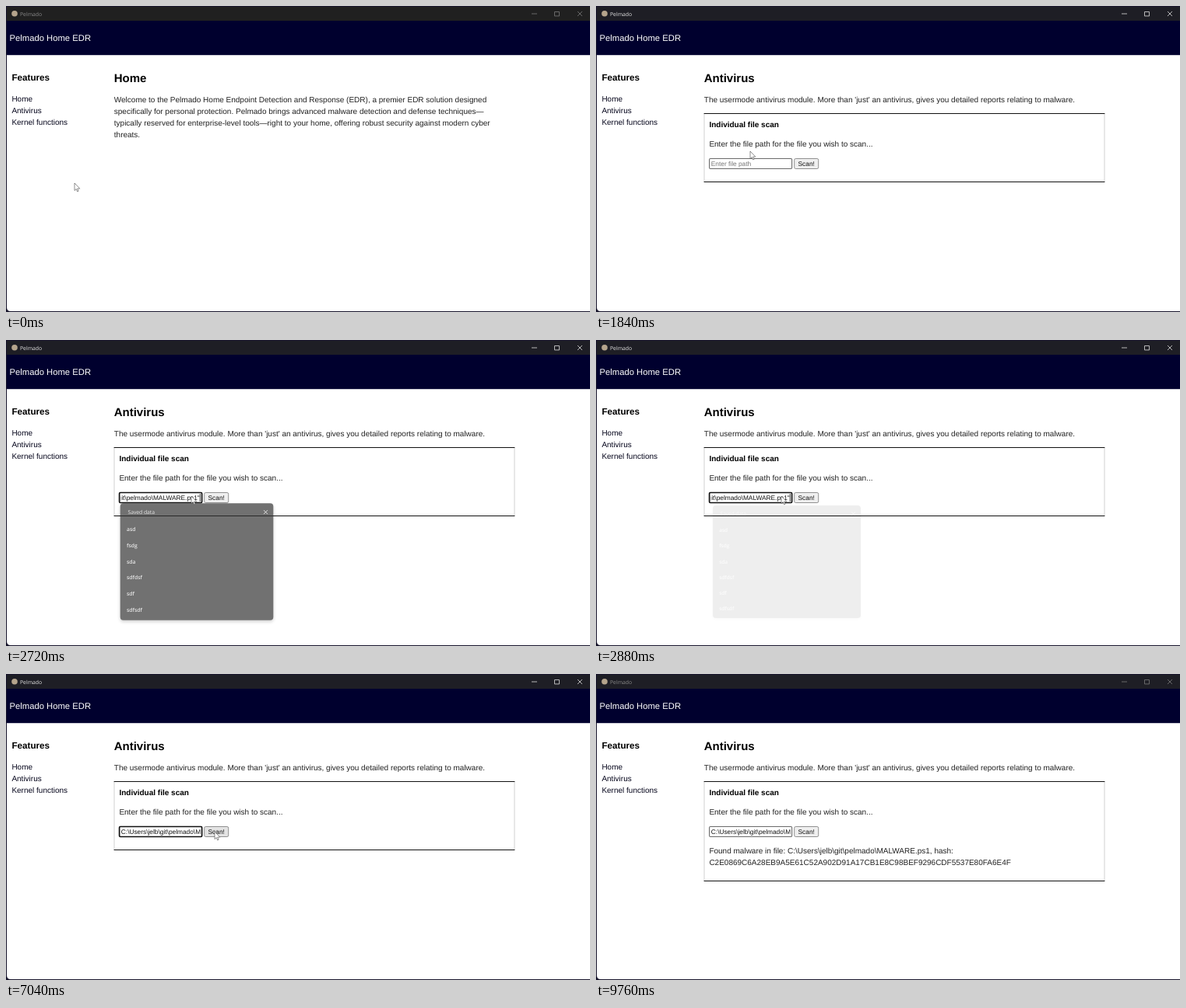
Write an HTML page that moves like this. It is 750x394 px and loops after 9840 ms.

```html
<!DOCTYPE html>
<html lang="en">
<head>
<meta charset="utf-8">
<title>Pelmado</title>
<style>
  html, body { margin: 0; width: 100%; height: 100%; overflow: hidden; background: #17142b; }
  svg { display: block; width: 100vw; height: 100vh; text-rendering: geometricPrecision; }
  text { font: 10px "Liberation Sans", Arial, sans-serif; fill: #222; white-space: pre; }
  .bold { font-weight: bold; fill: #000; }
  .h1 { font-size: 15px; }
  .h2 { font-size: 11.7px; }
  .brand { font-size: 11.25px; fill: #fff; }
  .link { fill: #06061c; }
  .field { font-size: 8.33px; fill: #111; }
  .ui { font: 6.85px "Open Sans", "Noto Sans", sans-serif; }
  #popup text { fill: #fff; fill-opacity: .85; }
  #popup .item { font-weight: 600; }
  #popup { filter: drop-shadow(0 2px 2px #0004); }
</style>
</head>
<body>
<svg viewBox="0 0 750 394">
  <defs><clipPath id="inner"><rect x="147.6" y="197" width="102.2" height="12"/></clipPath></defs>

  <!-- window -->
  <path d="M1 19H750V393H6Q1 393 1 388Z" fill="#fff"/>
  <rect id="bar" x="1" y="1" width="749" height="18"/>
  <rect x="1" y="19" width="749" height="44.2" fill="#00002e"/>
  <circle cx="11" cy="9.7" r="3.8" fill="#b5a48c"/>
  <text id="title" class="ui" x="18" y="12.6">Pelmado</text>
  <path id="buttons" d="M675 10H682M704.5 7.5H710.5V12.9H704.5ZM734 7L740 13M740 7L734 13" fill="none" stroke-width=".8"/>
  <text class="brand" x="4.6" y="45">Pelmado Home EDR</text>

  <!-- side menu -->
  <text class="bold h2" x="7.4" y="96.3">Features</text>
  <text class="link" x="7.4" y="122.5">Home</text>
  <text class="link" x="7.4" y="137.5">Antivirus</text>
  <text class="link" x="7.4" y="152.5">Kernel functions</text>

  <g id="home">
    <text class="bold h1" x="138.7" y="98.3">Home</text>
    <text x="138.8" y="124.3">Welcome to the Pelmado Home Endpoint Detection and Response (EDR), a premier EDR solution designed</text>
    <text x="138.8" y="139.3">specifically for personal protection. Pelmado brings advanced malware detection and defense techniques—</text>
    <text x="138.8" y="154.3">typically reserved for enterprise-level tools—right to your home, offering robust security against modern cyber</text>
    <text x="138.8" y="169.3">threats.</text>
  </g>

  <g id="scanner">
    <text class="bold h1" x="138.7" y="98.3">Antivirus</text>
    <text x="138.8" y="124.3">The usermode antivirus module. More than 'just' an antivirus, gives you detailed reports relating to malware.</text>
    <path id="sides" stroke="#d0d0d0"/>
    <path id="edges" stroke="#111"/>
    <text class="bold" x="145.4" y="156">Individual file scan</text>
    <text x="145.4" y="181">Enter the file path for the file you wish to scan...</text>
    <rect id="input" x="145.6" y="196.5" width="106" height="13" rx="1.2" fill="#fff"/>
    <g clip-path="url(#inner)">
      <text id="value" class="field" y="206"></text>
      <rect id="caret" y="198" width=".9" height="10"/>
    </g>
    <rect id="scan" x="254.7" y="196.5" width="31" height="13" rx="1.8" stroke="#767676" stroke-width=".8"/>
    <text class="field" x="270.2" y="206" text-anchor="middle">Scan!</text>
    <g id="result">
      <text x="145.4" y="231">Found malware in file: C:\Users\jelb\git\pelmado\MALWARE.ps1, hash:</text>
      <text x="145.4" y="246">C2E0869C6A28EB9A5E61C52A902D91A17CB1E8C98BEF9296CDF5537E80FA6E4F</text>
    </g>
    <g id="popup">
      <rect x="145" y="209" width="200" height="153" rx="4" fill="#333"/>
      <text class="ui" x="155" y="223.3">Saved data</text>
      <path d="M332.5 218L337.5 223M337.5 218L332.5 223" stroke="#fff" stroke-width=".8"/>
    </g>
  </g>
  <path id="cursor" d="M0 0V9.6L2.2 7.6 3.6 11 5.1 10.3 3.7 7.1H6.8Z" fill="#fff" stroke="#444" stroke-width=".6"/>
</svg>
<script>
const LOOP = 9840, STEP = 80;
const el = id => document.getElementById(id);
const set = (id, attrs) => { for (const k in attrs) el(id).setAttribute(k, attrs[k]); };
const show = (id, on) => { el(id).style.display = on ? '' : 'none'; };
const clamp = v => Math.max(0, Math.min(1, v));

['asd', 'fsdg', 'sda', 'sdfdsf', 'sdf', 'sdfsdf'].forEach((word, i) =>
  el('popup').insertAdjacentHTML('beforeend',
    `<text class="ui item" x="153.5" y="${245.3 + 21.2 * i}">${word}</text>`));

// time, x, y of the pointer tip
const path = [
  [0, 88, 228], [240, 72, 195], [480, 42, 147], [720, 31, 134],
  [1200, 33, 135], [1520, 110, 168], [1840, 198, 187], [2000, 228, 198],
  [2160, 238, 201], [2880, 238, 201], [3120, 266, 203], [6880, 266, 203],
  [7120, 269, 203], [7680, 269, 203], [7840, 257, 249], [8400, 257, 249],
  [8480, 267, 242], [8880, 267, 242], [8960, 503, 0]
];

function pointer(t) {
  const i = path.findIndex(p => p[0] > t);
  if (i < 0) return path.at(-1).slice(1);
  const [t0, x0, y0] = path[i - 1], [t1, x1, y1] = path[i];
  const u = (t - t0) / (t1 - t0);
  return [x0 + (x1 - x0) * u, y0 + (y1 - y0) * u];
}

const file = 'C:\\Users\\jelb\\git\\pelmado\\MALWARE.ps1';

function drawField(t) {
  const empty = t < 2720, atEnd = !empty && t < 5520;
  const focus = t >= 2160 && t < 7360;
  const value = el('value');
  value.textContent = empty ? 'Enter file path'
    : (t < 6000 ? '"' : '') + file + (t < 4080 ? '"' : '');
  value.style.fill = empty ? '#757575' : '';
  set('value', { x: atEnd ? 248.8 : 147.8, 'text-anchor': atEnd ? 'end' : 'start' });
  set('caret', { x: atEnd ? 248.8 : 147.9 });
  show('caret', focus && (t < 4720 || t >= 5520 && t < 6320));
  set('input', { stroke: focus ? '#101010' : '#6a6a6a', 'stroke-width': focus ? 1.7 : 1.1 });
}

function drawPopup(t) {
  const closing = clamp((t - 2640) / 260);
  const alpha = Math.min(clamp((t - 2160) / 320), 1 - closing);
  const scale = 1 - .055 * (t < 2640 ? 1 - alpha : closing);
  show('popup', alpha > 0);
  set('popup', {
    opacity: alpha,
    transform: `translate(245 285.5) scale(${scale}) translate(-245 -285.5)`
  });
}

function drawPanel(bottom) {
  set('sides', { d: `M139 138.5V${bottom}M653 138.5V${bottom}` });
  set('edges', { d: `M138.6 138.5H653.4M138.6 ${bottom}H653.4` });
}

function draw(t) {
  const active = t >= 1040 && t < 9760, scanned = t >= 7360;
  set('bar', { fill: t < 1040 ? '#202020' : '#1e1e25' });
  set('title', { style: `fill:${active ? '#e4e4e4' : '#8a8a8a'}` });
  set('buttons', { stroke: active ? '#e0e0e0' : '#7c7c7c' });
  show('home', t < 1120);
  show('scanner', t >= 1120);
  show('result', scanned);
  drawPanel(scanned ? 266.5 : 226.5);
  set('scan', { fill: t >= 3040 && t < 7760 ? '#e3e3e3' : '#efefef' });
  drawField(t);
  drawPopup(t);
  show('cursor', t < 9040);
  set('cursor', { transform: `translate(${pointer(t)})` });
}

const start = performance.now();
function tick() {
  const t = (performance.now() - start) % LOOP;
  draw(Math.floor(t / STEP) * STEP);
  requestAnimationFrame(tick);
}
tick();
</script>
</body>
</html>
```
